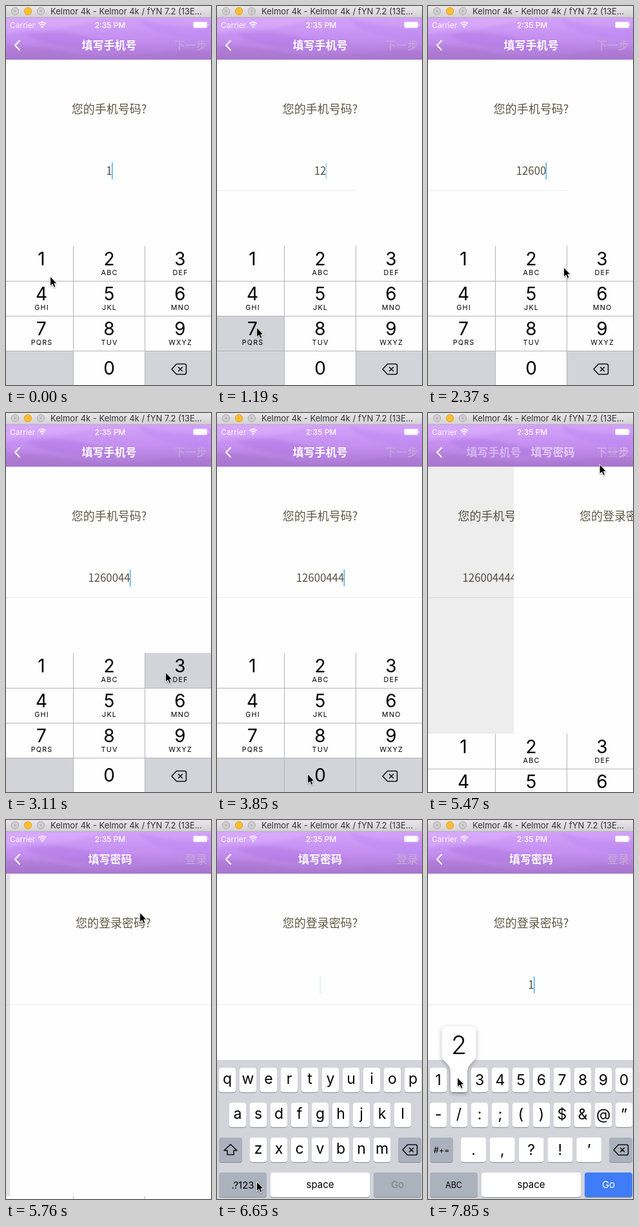
An HTML page for the animation above (7.99 s loop, 318x586 px).

```html
<!DOCTYPE html>
<html lang="zh-CN">
<head>
<meta charset="utf-8">
<title>Sign in</title>
<style>
html, body { margin: 0; width: 100%; height: 100%; overflow: hidden; background: #fefefe; }
svg { display: block; width: 100vw; height: 100vh; }
text { font-family: Inter, Roboto, sans-serif; }
.cn { font-family: "Noto Sans CJK SC Light", "Noto Sans CJK SC", "Noto Sans CJK", sans-serif; font-weight: 300; }
.mid { text-anchor: middle; }
.nav { font-size: 17px; fill: #fff; }
.off { fill: #c6acd8; }
.bold { font-family: "Noto Sans CJK SC", "Noto Sans CJK", sans-serif; font-weight: 700; }
.ask { font-size: 18px; fill: #5f5743; }
.num { font-size: 16.8px; fill: #575040; }
</style>
</head>
<body>
<svg id="stage" viewBox="0 0 318 586" preserveAspectRatio="none" xmlns="http://www.w3.org/2000/svg"></svg>
<script>
const LOOP = 7990, TICKS = 54, STEP = LOOP / TICKS;
const GREY = '#d2d4da', FUNC = '#abb1bd', BLUE = '#3f7df8', RULE = '#b3b4b8';
const NUMBER = '12600444409';

// Key presses on the number pad: [down, up, key], in ticks
const presses = [[3, 4, 5], [8, 9, 7], [12, 13, 1], [14, 15, 1], [17, 18, 3],
  [19, 20, 3], [21, 23, 3], [26, 27, 0], [28, 29, 5], [31, 32, 3]];

// Pointer stops: [tick, x, y]
const route = [[0, 69, 419], [3, 138, 450], [4, 138, 450], [7, 62, 498], [9, 62, 498],
  [12, 60, 398], [15, 60, 398], [16, 211, 405], [17, 248, 402], [23, 248, 402],
  [26, 141, 559], [27, 141, 559], [28, 150, 462], [29, 150, 462], [31, 237, 407],
  [32, 237, 407], [35, 287, 58], [36, 287, 58], [39, 208, 144], [45, 62, 560],
  [47, 62, 560], [50, 14, 402], [51, 14, 402], [53, 46, 399]];

const PUSH = 36, RISE = 40.5, FOCUS = 40.55, SYMBOLS = 47, FIRST = 51;

const rect = (x, y, w, h, fill, more = '') =>
  `<rect x="${x}" y="${y}" width="${w}" height="${h}" fill="${fill}" ${more}/>`;
const path = (d, more) => `<path d="${d}" ${more}/>`;
const text = (x, y, s, more = '') =>
  `<text x="${x}" y="${y}" ${more}>${s.replace(/&/g, '&amp;')}</text>`;
const label = (x, y, s, size, more = '') =>
  text(x, y, s, `class="mid" font-size="${size}" ${more}`);
const group = (id, body, more = '') => `<g id="${id}" ${more}>${body}</g>`;
const erase = (x, y) => path('M8 0H20.5Q23 0 23 2.5V13.5Q23 16 20.5 16H8L0.5 8Z M11 5L17 11M17 5L11 11',
  `transform="translate(${x} ${y})" fill="none" stroke="#111" stroke-width="1.6" stroke-linejoin="round" stroke-linecap="round"`);

function windowBar() {
  const light = (x, fill, edge) => `<circle cx="${x}" cy="8" r="5.7" fill="${fill}" stroke="${edge}" stroke-width=".9"/>`;
  return rect(0, 0, 318, 18, 'url(#bar)') + rect(0, 17.3, 318, .9, '#b3aab8') +
    light(14, '#d0ced0', '#aaa8aa') + light(34, '#fdbd2e', '#dda023') + light(54, '#d0ced0', '#aaa8aa') +
    '<circle cx="14" cy="8" r="1.6" fill="#b4b2b4"/><circle cx="54" cy="8" r="1.6" fill="#b4b2b4"/>' +
    text(69, 13, 'Kelmor 4k - Kelmor 4k / fYN 7.2 (13E...', 'font-size="13" fill="#343234"');
}

function navBar() {
  const wave = (d, fill, o) => path(d, `fill="${fill}" opacity="${o}"`);
  return rect(0, 18, 318, 65, 'url(#nav)') +
    '<g filter="url(#soft)" clip-path="url(#navClip)">' +
    wave('M0 18H150Q110 34 60 36T0 44Z', '#ddb2fd', .5) +
    wave('M30 44Q80 36 120 46T210 60Q150 70 100 64T30 44Z', '#ad74e2', .4) +
    wave('M205 18Q250 36 318 32V54Q270 52 240 42T205 18Z', '#b884f2', .4) +
    wave('M0 62Q50 60 100 72T220 74T318 70V83H0Z', '#a674c8', .4) + '</g>' +
    text(6, 33.5, 'Carrier', 'font-size="12" fill="#fff" fill-opacity=".9"') +
    path('M50.5 27.4Q56.2 22.4 62 27.4M52.6 29.7Q56.2 26.6 59.9 29.7', 'fill="none" stroke="#fff" stroke-width="1.5"') +
    path('M56.2 33.8L54 31.4Q56.2 29.6 58.5 31.4Z', 'fill="#fff"') +
    label(161.5, 33.5, '2:35 PM', 12, 'fill="#fff" font-weight="500"') +
    '<rect x="290.5" y="24.5" width="21.5" height="9.4" rx="2" fill="none" stroke="#fff" stroke-opacity=".45"/>' +
    rect(291, 25, 20.5, 8.4, '#fff', 'rx="1.2"') + path('M313 27.4Q314.8 29.2 313 31Z', 'fill="#fff"') +
    path('M21 53.5L14 60.7L21 68', 'fill="none" stroke="#fff" stroke-width="2" stroke-linecap="round" stroke-linejoin="round"') +
    group('oldNav', text(160, 67, '填写手机号', 'id="oldTitle" class="cn nav mid bold"') +
      text(312, 67, '下一步', 'id="next" class="cn nav" text-anchor="end"')) +
    group('newNav', text(160, 67, '填写密码', 'id="newTitle" class="cn nav mid bold"') +
      text(312, 67, '登录', 'class="cn nav off" text-anchor="end"'));
}

function page(id, question) {
  return group(id, rect(0, 83, 318, 503, '#fefefe') + text(160, 166, question, 'class="cn ask mid"') +
    rect(0, 285, 318, 1, '#ececec', `id="${id}Line"`) +
    text(160, 261, '', `id="${id}Text" class="cn num mid"`) +
    rect(0, 242, 1.7, 26, '#5cb4ec', `id="${id}Caret"`));
}

const padX = [0, 105, 216, 318], padMid = [55, 160, 270];
function numberPad() {
  const names = ['', 'ABC', 'DEF', 'GHI', 'JKL', 'MNO', 'PQRS', 'TUV', 'WXYZ'];
  let s = rect(0, 371, 318, 215, '#fefefe') + rect(0, 533, 104, 53, GREY) + rect(216, 533, 102, 53, GREY) +
    rect(0, 0, 0, 54, GREY, 'id="pressed"');
  for (const y of [425, 479, 533]) s += rect(0, y, 318, 1, RULE);
  for (const x of [104, 215]) s += rect(x, 371, 1, 215, RULE);
  names.forEach((name, i) => {
    const x = padMid[i % 3], y = 54 * Math.floor(i / 3);
    s += label(x, 401 + y, String(i + 1), 28) +
      label(x + .6, 416 + y, name, 10.8, 'letter-spacing="1.2"');
  });
  return s + label(160, 570, '0', 28) + erase(256.5, 553.5);
}

const key = (x, y, w, fill = '#fff', id = '') =>
  rect(x, y + 1, w, 38, '#898c92', 'rx="4"') + rect(x, y, w, 38, fill, `rx="4" ${id && `id="${id}"`}`);
const row = (chars, x, y, base, step = 32, w = 26) => [...chars].map((c, i) =>
  key(x + i * step, y, w) + label(x + i * step + w / 2, y + base, c, 23)).join('');

function keyboard() {
  const letters = row('qwertyuiop', 3, 383, 25) + row('asdfghjkl', 19, 437, 25) + row('zxcvbnm', 51, 491, 25) +
    path('M21 501.5L31 511H26V517.5H16V511H11Z', 'fill="none" stroke="#111" stroke-width="1.6" stroke-linejoin="round"') +
    label(40, 570, '.?123', 15);
  const symbols = row('1234567890', 3, 383, 27) + row('-/:;()$&@”', 3, 437, 26) +
    row('.,?!’', 51, 491, 27, 44.8, 39) + label(21, 515, '#+=', 12.5) + label(40, 569, 'ABC', 12.5);
  return rect(0, 371, 318, 215, GREY) + key(3, 491, 36, FUNC) + key(281, 491, 36, FUNC) + erase(287.5, 502) +
    key(3, 545, 74, FUNC, 'mode') + key(83, 545, 154) + label(160, 569, 'space', 15) +
    key(243, 545, 74, FUNC, 'go') + label(280, 569, 'Go', 15, 'id="goText"') +
    group('letters', letters) + group('symbols', symbols);
}

const popup = path('M-18 319H18Q26.5 319 26.5 327V362C26.5 376 13 374 13 390V417Q13 421 9 421H-9Q-13 421 -13 417V390C-13 374 -26.5 376 -26.5 362V327Q-26.5 319 -18 319Z',
  'fill="#fff" filter="url(#shade)"') + label(0, 362, '', 39, 'id="popText" font-weight="300"');

document.getElementById('stage').innerHTML = `<defs>
  <linearGradient id="bar" x2="0" y2="1"><stop stop-color="#e9e7e9"/><stop offset="1" stop-color="#d2d0d3"/></linearGradient>
  <linearGradient id="nav" x2="0" y2="1"><stop stop-color="#d3a2fa"/><stop offset=".5" stop-color="#c48ff0"/><stop offset="1" stop-color="#ab78d2"/></linearGradient>
  <clipPath id="navClip"><rect y="18" width="318" height="65"/></clipPath>
  <filter id="soft"><feGaussianBlur stdDeviation="2"/></filter>
  <filter id="shade" x="-30%" y="-20%" width="160%" height="140%"><feDropShadow dx="0" dy="2" stdDeviation="3" flood-opacity=".3"/></filter>
  <filter id="drop" x="-40%" y="-20%" width="180%" height="150%"><feDropShadow dx="0" dy="1" stdDeviation=".8" flood-opacity=".4"/></filter>
</defs>` +
  page('phone', '您的手机号码?') + rect(0, 83, 318, 503, '#000', 'id="dim"') + page('pass', '您的登录密码?') +
  group('pad', numberPad()) + group('keys', keyboard()) + group('pop', popup) +
  navBar() + windowBar() +
  group('pointer', path('M-.4 -.9V14L3.1 10.9L5.4 16.2L8 15.1L5.8 10H10.2Z',
    'fill="#000" stroke="#fff" stroke-width="1" stroke-linejoin="round" filter="url(#drop)"'));

const el = {};
document.querySelectorAll('[id]').forEach(n => el[n.id] = n);
const set = (id, attrs) => { for (const k in attrs) el[id].setAttribute(k, attrs[k]); };
const show = (id, on) => set(id, { visibility: on ? 'visible' : 'hidden' });
const move = (id, x, y) => set(id, { transform: `translate(${x.toFixed(2)} ${y.toFixed(2)})` });

// Critically damped spring from 1 to 0
function spring(ticks) {
  const u = Math.max(0, ticks) * STEP * .0132;
  return (1 + u) * Math.exp(-u);
}

function blink(ticks) {
  const p = (ticks * STEP) % 1000;
  if (p < 500) return 1;
  return p < 850 ? Math.max(0, 1 - (p - 500) / 200) : (p - 850) / 150;
}

function pointerAt(t) {
  const i = route.findIndex(r => r[0] > t);
  if (i < 0) return route[route.length - 1].slice(1);
  const [t0, x0, y0] = route[i - 1], [t1, x1, y1] = route[i];
  const u = (t - t0) / (t1 - t0), e = u * u * (3 - 2 * u);
  return [x0 + (x1 - x0) * e, y0 + (y1 - y0) * e];
}

function field(id, value, alpha) {
  el[id + 'Text'].textContent = value;
  set(id + 'Caret', { x: 159.3 + 4.65 * value.length, opacity: alpha });
}

function draw(t) {
  const done = presses.filter(p => p[1] <= t);
  const down = presses.find(p => p[0] <= t && t < p[1]);
  const count = done.length + 1;
  const typed = done.length ? done[done.length - 1][1] : -2;
  const rest = spring(t - PUSH), pushed = t >= PUSH;

  field('phone', NUMBER.slice(0, count), blink(t - typed));
  set('phoneLine', { width: t < 8 ? 0 : t < 18 ? 215 : 318 });
  show('pressed', down);
  if (down) {
    const k = down[2], col = k ? (k - 1) % 3 : 1, line = k ? Math.floor((k - 1) / 3) : 3;
    set('pressed', { x: padX[col], y: 371 + 54 * line, width: padX[col + 1] - padX[col] });
  }

  move('phone', -95 * (1 - rest), 0);
  set('dim', { opacity: .115 * (1 - rest) });
  move('pass', 318 * rest, 0);
  show('pass', pushed);
  set('oldNav', { opacity: rest });
  set('newNav', { opacity: 1 - rest });
  move('oldTitle', -100 * (1 - rest), 0);
  move('newTitle', 80 * rest, 0);
  el.next.classList.toggle('off', count < NUMBER.length);
  move('pad', 0, 215 * (1 - rest));
  show('pad', t < RISE);

  const entered = t >= FIRST, sym = t >= SYMBOLS;
  field('pass', entered ? '1' : '', t < FOCUS ? 0 : blink(t - (entered ? FIRST : FOCUS)));
  move('keys', 0, Math.round(215 * spring(t - RISE)));
  show('keys', t > RISE);
  show('letters', t > RISE && !sym);
  show('symbols', sym);
  set('mode', { fill: t === SYMBOLS - 1 ? '#fff' : FUNC });
  set('go', { fill: entered ? BLUE : FUNC });
  set('goText', { fill: entered ? '#fff' : '#7b8089' });

  const hit = t === FIRST - 1 ? 1 : t === TICKS - 1 ? 2 : 0;
  show('pop', hit);
  el.popText.textContent = hit || '';
  move('pop', hit === 1 ? 26.5 : 48, 0);

  move('pointer', ...pointerAt(t));
}

const start = performance.now();
function frame() {
  const ms = (performance.now() - start) % LOOP;
  draw(Math.min(TICKS - 1, Math.floor(ms / STEP + .1)));
  requestAnimationFrame(frame);
}
draw(0);
requestAnimationFrame(frame);
</script>
</body>
</html>
```
